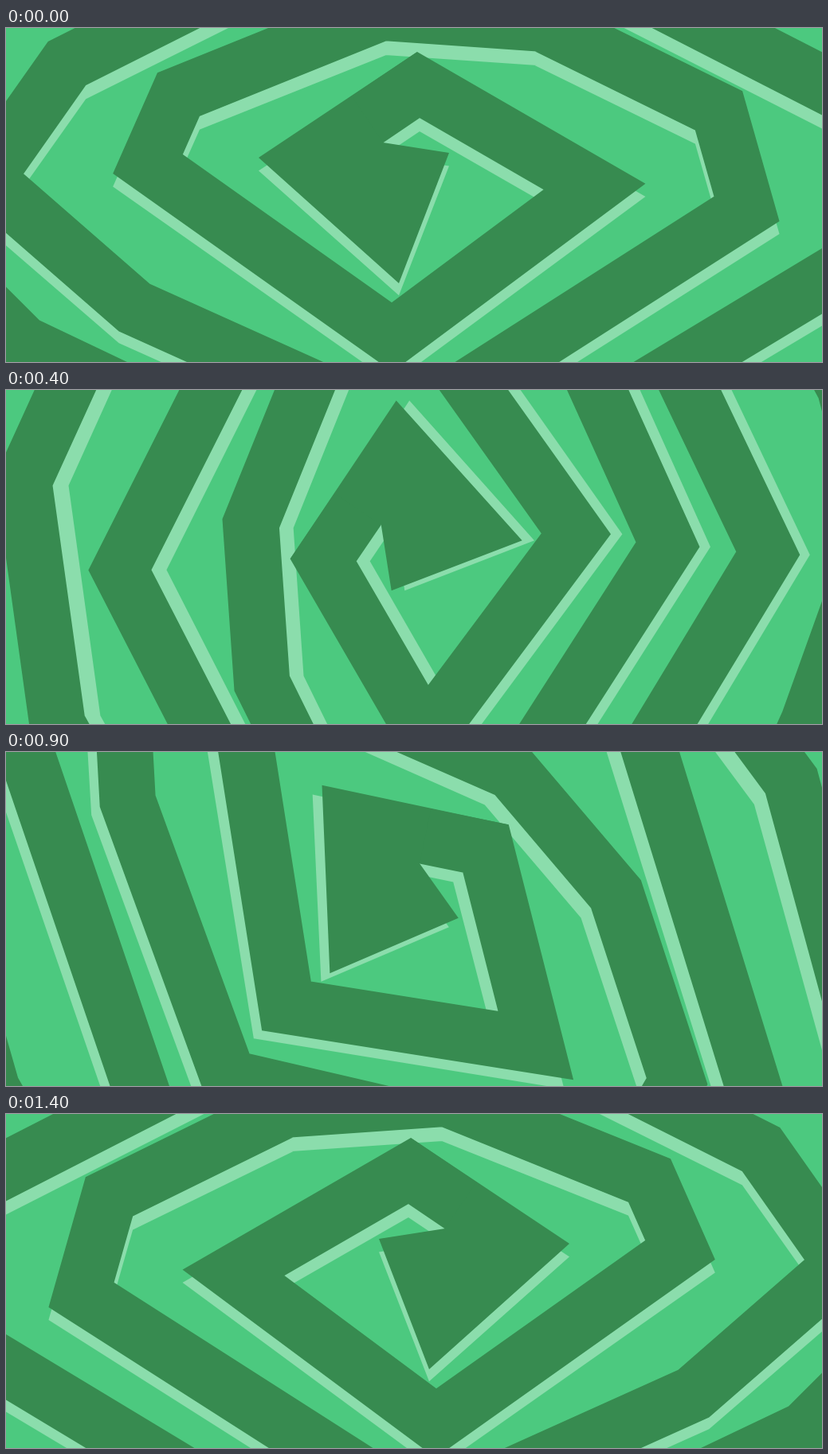
An HTML page with a canvas that plays this animation: 1024 by 420 pixels, repeating every 1.5 s.

```html
<!DOCTYPE html>
<html lang="en">
<head>
<meta charset="utf-8">
<title>Spiral</title>
<style>
  html, body { margin: 0; width: 100%; height: 100%; overflow: hidden; background: #4cc97f; }
  canvas { display: block; }
</style>
</head>
<body>
<canvas id="stage" width="1024" height="420"></canvas>
<script>
const W = 1024, H = 420, STEP = 100, STEPS = 15;
const PIVOT_X = 500.5, PIVOT_Y = 196.8;
const ctx = document.getElementById('stage').getContext('2d');

// The band is one mitred stroke of constant width along this centre line,
// joined to a solid core.
const band = new Path2D(`M453.5 115 L517.5 71.5 738.5 199.5 484.5 388.7
  178 171 216.5 83.5 471.5 -19.5 672.5 -5.5 894.5 104 929.5 227.5 498 503.8
  161 351.5 -25 189 76.5 44.5 530 -183.8 1246 184 509 629.6
  21 396.5 -336 39 418.5 -304.5 724.5 -262 1659 258 722 680 471 770 301 726 -100 510`);
const core = new Path2D('M473 144 L556 157 493 321 317 163 516 30 Z');
ctx.lineWidth = 70.5;
ctx.lineJoin = 'miter';

// Winding accelerates from rest to a quarter turn.
const turns = [0, 18, 45.7, 90];

// The spiral winds up, then unwinds mirrored. This happens twice without the
// second resting step; the second peak is also upside down.
function poseAt(step) {
  const lap = step < 8 ? 0 : 1;
  const k = (step + lap) % 8;
  const turn = Math.min(k, 7 - k);
  return {
    angle: turns[turn] * Math.PI / 180,
    flipX: k < 4 ? 1 : -1,
    flipY: lap && turn === 3 ? -1 : 1
  };
}

function paintSpiral(color) {
  ctx.fillStyle = ctx.strokeStyle = color;
  ctx.fill(core);
  ctx.stroke(band);
}

function draw() {
  const step = Math.floor(performance.now() / STEP) % STEPS;
  const { angle, flipX, flipY } = poseAt(step);
  ctx.resetTransform();
  ctx.fillStyle = '#4cc97f';
  ctx.fillRect(0, 0, W, H);
  ctx.translate(W / 2, H / 2);
  ctx.scale(flipX, flipY);
  ctx.translate(PIVOT_X - W / 2, PIVOT_Y - H / 2);
  ctx.rotate(angle);
  ctx.translate(-PIVOT_X, -PIVOT_Y);

  // The pale underside lies slightly lower and flatter.
  ctx.save();
  ctx.transform(1, 0, 0, 0.992, 0, 17.85);
  paintSpiral('#8bddac');
  ctx.restore();
  paintSpiral('#378b50');
  requestAnimationFrame(draw);
}
draw();
</script>
</body>
</html>
```
